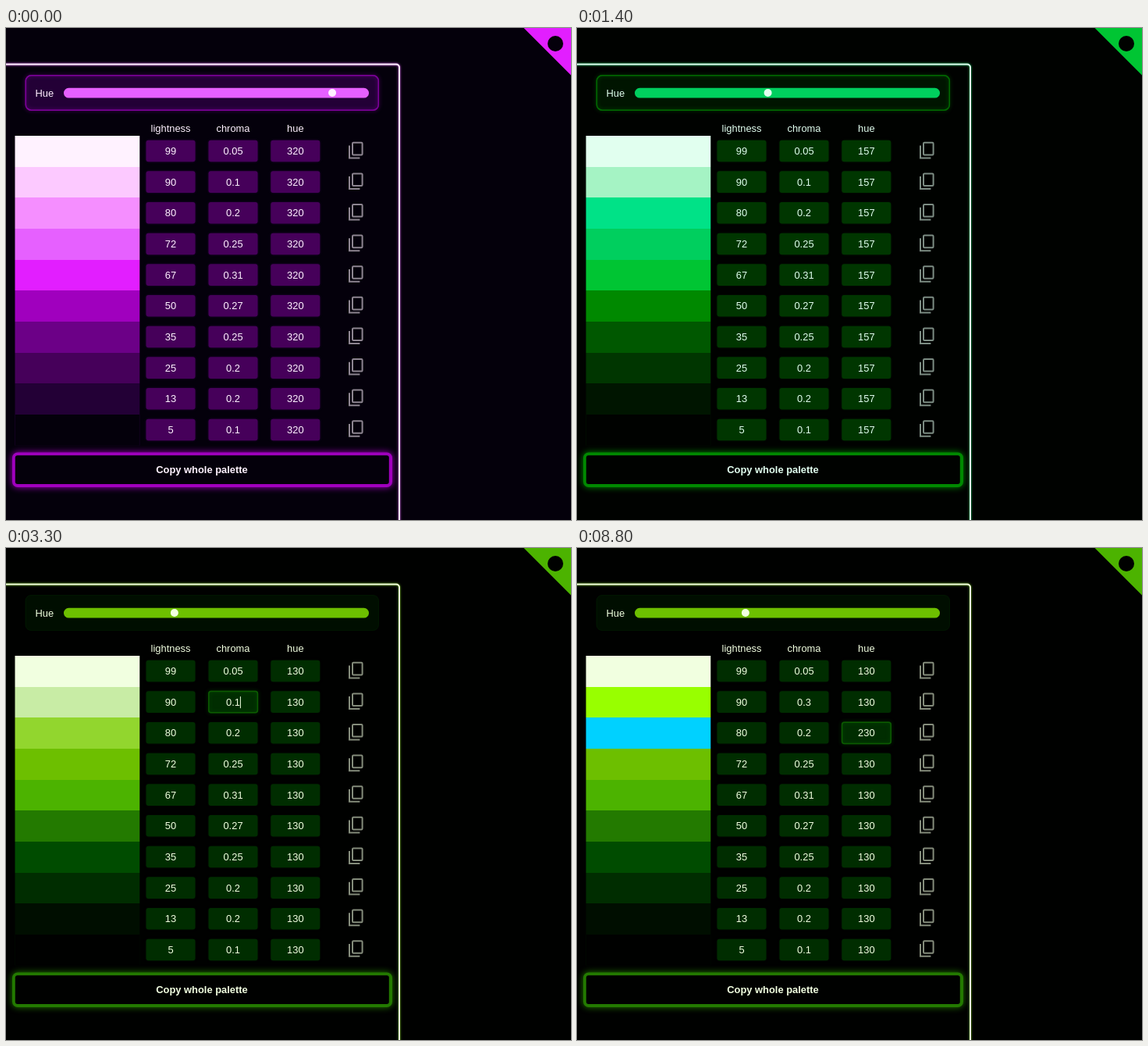
These frames come from a looping animation (724 by 630 pixels, 8900 ms). An HTML page with a canvas:

```html
<!DOCTYPE html>
<html lang="en">
<head>
<meta charset="utf-8">
<title>Palette</title>
<style>
html, body { margin: 0; width: 724px; height: 630px; overflow: hidden; background: #000; }
canvas { display: block; }
</style>
</head>
<body>
<canvas id="stage" width="724" height="630"></canvas>
<script>
const ctx = document.getElementById('stage').getContext('2d');
const LOOP = 8900, STEP = 100;
const ROW = 39.66, TOP = 138;
const COLS = [211, 291, 370.8];
const TONES = [[99, .05], [90, .1], [80, .2], [72, .25], [67, .31],
  [50, .27], [35, .25], [25, .2], [13, .2], [5, .1]];
// time, hue: the slider drag
const DRAG = [[500, 320], [600, 314], [700, 299], [900, 256], [1400, 157], [1800, 95],
  [1900, 84], [2000, 77], [2100, 75], [2200, 82], [2300, 97], [2500, 126], [2600, 130]];
const FONT = '"Liberation Sans", Arial, sans-serif';

const clamp = v => Math.min(1, Math.max(0, v));

// OKLCH to sRGB, clipped per channel
function oklch(light, chroma, hue) {
  const L = light / 100, h = hue * Math.PI / 180;
  const a = chroma * Math.cos(h), b = chroma * Math.sin(h);
  const l = (L + .39634 * a + .2158 * b) ** 3;
  const m = (L - .10556 * a - .06385 * b) ** 3;
  const s = (L - .08948 * a - 1.29149 * b) ** 3;
  const rgb = [
    4.07674 * l - 3.30771 * m + .23097 * s,
    -1.26844 * l + 2.60976 * m - .34132 * s,
    -.0042 * l - .70342 * m + 1.70761 * s
  ].map(v => {
    v = clamp(v);
    v = v <= .0031308 ? 12.92 * v : 1.055 * v ** (1 / 2.4) - .055;
    return Math.round(v * 255);
  });
  return `rgb(${rgb})`;
}

function hueAt(t) {
  if (t <= DRAG[0][0]) return DRAG[0][1];
  for (let i = 1; i < DRAG.length; i++) {
    const [t0, h0] = DRAG[i - 1], [t1, h1] = DRAG[i];
    if (t <= t1) return Math.round(h0 + (h1 - h0) * (t - t0) / (t1 - t0));
  }
  return DRAG[DRAG.length - 1][1];
}

// three-step fade whose first visible step falls on start
const fade = (t, start) => clamp((t - start + STEP) / 300);

function box(x, y, w, h, r) {
  ctx.beginPath();
  ctx.roundRect(x, y, w, h, r);
}

function glow(color, blur) {
  ctx.shadowColor = color;
  ctx.shadowBlur = blur;
}

function text(str, x, y, align = 'center', weight = '') {
  ctx.font = `${weight} 12.9px ${FONT}`;
  ctx.textAlign = align;
  ctx.fillText(str, x, y);
}

function focusRing(x, y, w, h, r, power, c) {
  if (power <= 0) return;
  ctx.save();
  ctx.globalAlpha = power;
  box(x, y, w, h, r);
  ctx.lineWidth = 1.5;
  ctx.strokeStyle = c[6];
  glow(c[6], 5);
  ctx.stroke();
  glow('transparent', 0);
  ctx.globalAlpha = power * .35;
  ctx.strokeStyle = c[5];
  ctx.stroke();
  ctx.restore();
}

function copyIcon(y) {
  box(444, y - 10, 12.6, 15.6, 1.2);
  ctx.stroke();
  ctx.beginPath();
  ctx.moveTo(440, y - 6.3);
  ctx.lineTo(440, y + 9.6);
  ctx.lineTo(453.4, y + 9.6);
  ctx.stroke();
}

function drawCorner(c) {
  ctx.fillStyle = c[4];
  ctx.beginPath();
  ctx.moveTo(663.5, 0);
  ctx.lineTo(724, 0);
  ctx.lineTo(724, 60.5);
  ctx.fill();
  ctx.fillStyle = c[9];
  ctx.beginPath();
  ctx.arc(704, 20, 10, 0, 7);
  ctx.fill();
}

function drawPanel(c) {
  ctx.save();
  box(-40, 46.6, 544, 640, 4);
  ctx.strokeStyle = c[0];
  ctx.lineWidth = 2;
  glow(c[3], 3);
  ctx.stroke();
  ctx.restore();
}

function drawSlider(t, hue, c) {
  ctx.fillStyle = c[8];
  box(25, 60.5, 452.5, 45, 7);
  ctx.fill();
  ctx.save();
  ctx.globalAlpha = .4;
  ctx.strokeStyle = c[7];
  ctx.lineWidth = 1;
  ctx.stroke();
  ctx.restore();
  focusRing(25.3, 60.8, 452, 44.4, 7, 1 - fade(t, 2600), c);
  ctx.fillStyle = c[3];
  box(74, 76.8, 391, 12.7, 6.3);
  ctx.fill();
  ctx.fillStyle = c[0];
  ctx.beginPath();
  ctx.arc(77.5 + 1.0643 * hue, 83, 5, 0, 7);
  ctx.fill();
  text('Hue', 37.5, 87.8, 'left');
}

function drawCell(str, col, row, c, ring) {
  const x = COLS[col] - 31.5, y = TOP + row * ROW + 5.7;
  ctx.save();
  ctx.fillStyle = c[7];
  glow(c[8], 3);
  box(x, y, 63, 27.6, 3);
  ctx.fill();
  ctx.restore();
  focusRing(x + .3, y + .2, 62.6, 27.2, 3, ring, c);
  ctx.fillStyle = c[0];
  text(str, COLS[col], y + 18.4);
}

function drawButton(c) {
  ctx.save();
  ctx.fillStyle = c[5];
  glow(c[5], 8);
  box(8, 543.5, 487, 44.5, 7);
  ctx.fill();
  ctx.restore();
  ctx.fillStyle = c[9];
  box(11.8, 547.3, 479, 36.7, 3);
  ctx.fill();
  ctx.fillStyle = c[0];
  text('Copy whole palette', 251, 570.2, 'center', 'bold');
}

// caret x for the moment, and the row it stands in; null while hidden
function caretAt(t) {
  if (t >= 3300 && t < 6000) {
    const off = (t >= 3900 && t < 4400) || (t >= 5200 && t < 5700);
    return off ? null : [300.4, 1];
  }
  if (t < 6000) return null;
  if (t < 6500) return [381.4, 2];
  if (t < 6800) return [374.5, 2];
  if (t < 7100) return [367.3, 2];
  if (t < 7300) return [364, 2];
  const off = (t >= 7800 && t < 8300) || t >= 8800;
  return off ? null : [367.3, 2];
}

function draw(t) {
  const hue = hueAt(t);
  const c = TONES.map(([l, ch]) => oklch(l, ch, hue));
  const editedHue = t < 7100 ? hue : t < 7300 ? 30 : 230;
  const chromaRing = fade(t, 3100) * (1 - fade(t, 6000));
  const hueRing = fade(t, 5500);

  ctx.fillStyle = c[9];
  ctx.fillRect(0, 0, 724, 630);
  drawCorner(c);
  drawPanel(c);
  drawSlider(t, hue, c);

  ctx.fillStyle = c[0];
  ['lightness', 'chroma', 'hue'].forEach((name, i) => text(name, COLS[i], 132.6));

  ctx.fillStyle = c[8];
  ctx.globalAlpha = .6;
  ctx.fillRect(11, TOP + 9 * ROW, 160.5, ROW);
  ctx.globalAlpha = 1;
  ctx.fillStyle = c[9];
  ctx.fillRect(11.8, TOP + 9 * ROW, 159, ROW);

  TONES.forEach(([light, base], i) => {
    const chroma = i === 1 && t >= 4700 ? .3 : base;
    const h = i === 2 ? editedHue : hue;
    if (i < 9) {
      const y = Math.round(TOP + i * ROW);
      ctx.fillStyle = oklch(light, chroma, h);
      ctx.fillRect(11.5, y, 159.8, Math.round(TOP + (i + 1) * ROW) - y);
    }
    drawCell(light, 0, i, c, 0);
    drawCell(chroma, 1, i, c, i === 1 ? chromaRing : 0);
    drawCell(h, 2, i, c, i === 2 ? hueRing : 0);
    ctx.save();
    ctx.globalAlpha = .55;
    ctx.strokeStyle = c[0];
    ctx.lineWidth = 2;
    copyIcon(156.8 + i * 39.6);
    ctx.restore();
  });

  const caret = caretAt(t);
  if (caret) {
    ctx.fillStyle = c[0];
    ctx.fillRect(caret[0] - .5, TOP + caret[1] * ROW + 12.5, 1, 15);
  }
  drawButton(c);
}

const start = performance.now();
function tick() {
  const t = (performance.now() - start) % LOOP;
  draw(Math.floor(t / STEP) * STEP);
  requestAnimationFrame(tick);
}
tick();
</script>
</body>
</html>
```
